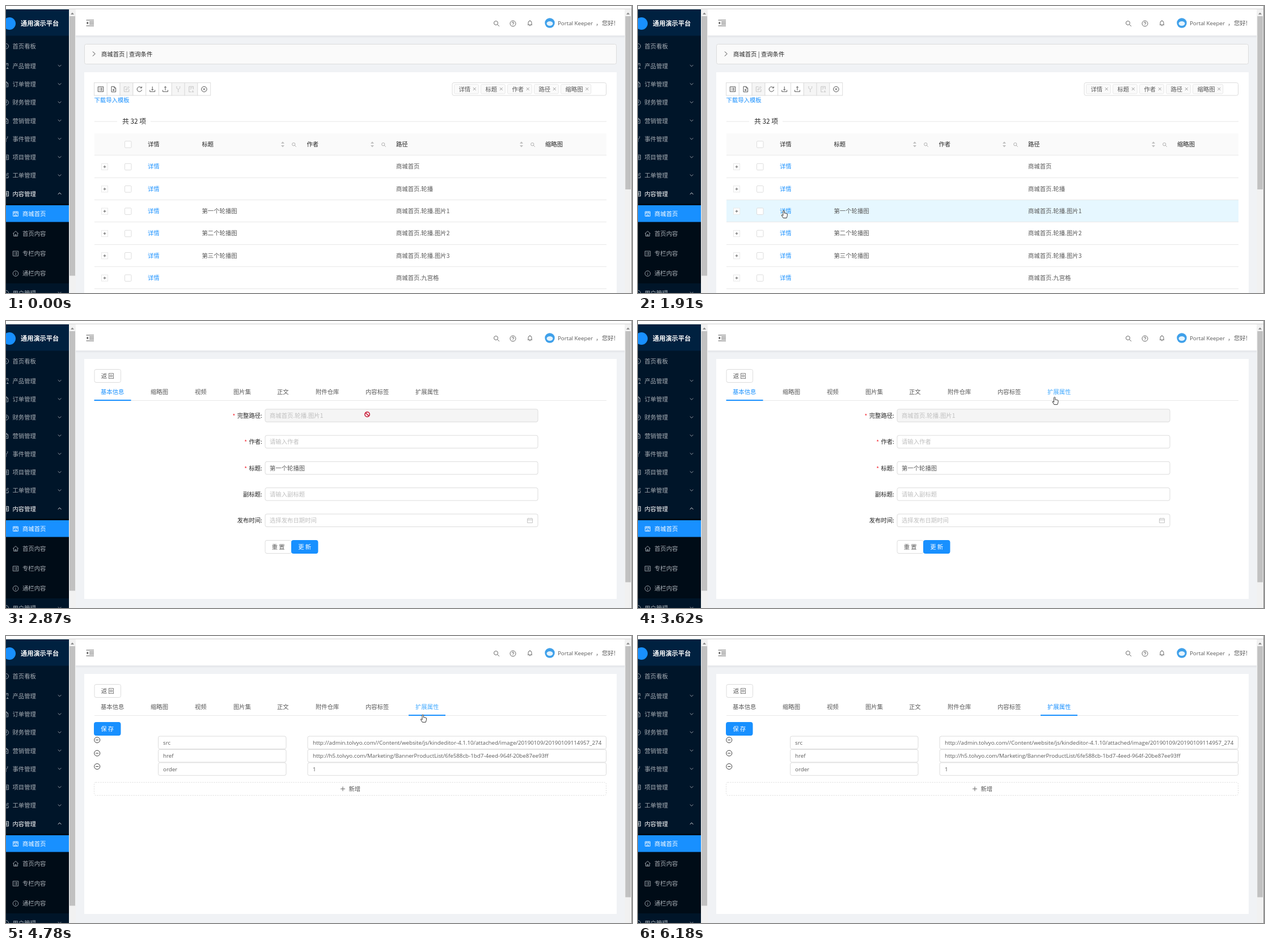
An HTML page that plays this animation: 1104 px wide and 507 px high, repeating every 6.49 s.

```html
<!DOCTYPE html>
<html lang="zh-CN">
<head>
<meta charset="utf-8">
<title>内容管理</title>
<style>
  html, body { margin: 0; width: 100%; height: 100%; overflow: hidden; background: #fff; }
  svg { display: block; }
  text { font: 10.36px "Noto Sans CJK SC", sans-serif; white-space: pre; }
  .latin { font: 9.75px "Open Sans", sans-serif; }
  .brand { font-size: 11.2px; font-weight: 700; }
  .total { font-size: 11.8px; font-weight: 500; }
</style>
</head>
<body>
<svg id="stage" width="1104" height="507" viewBox="0 0 1104 507"></svg>
<script>
const LOOP = 6490, OPEN = 1970, SWITCH = 3850, LEAVE = 6180;
const BLUE = '#1890ff', HOVER = '#40a9ff', INK = '#595959', DARK = '#262626',
      LINE = '#dcdcdc', PALE = '#e8e8e8', FAINT = '#bfbfbf', MENU = '#a6adb4';

// Shapes are centred on 0,0
const ring = 'M5 0A5 5 0 1 1-5 0A5 5 0 1 1 5 0';
const icons = {
  list: 'M-5-4.5H5V4.5H-5ZM-3-2h1M-3 0h1M-3 2h1M-.5-2H3M-.5 0H3M-.5 2H3',
  fileAdd: 'M-4-5H1L4-2V5H-4ZM1-5V-2H4M-2 1.5H2M0-.5V3.5',
  edit: 'M0-4.5H-4.5V4.5H4.5V0M-1.5 1.5L-1-.5L3.5-5L5-3.5L.5 1Z',
  reload: 'M3.6-2.7A4.5 4.5 0 1 0 4.4 1M4.2-5V-2.3H1.4',
  download: 'M-4.7 1.5V4.5H4.7V1.5M0-5V2M-2 0L0 2L2 0',
  upload: 'M-4.7 1.5V4.5H4.7V1.5M0 2V-5M-2-3L0-5L2-3',
  fork: 'M-3-3.5V-2L0 .5L3-2V-3.5M0 .5V4M-4-4.5h2M2-4.5h2M-1 4.5h2',
  audit: 'M0 5H-4V-5H4V0M-2-2.5H2M-2 0H0M1 5H5M3 5V2',
  close: ring + 'M-2-2L2 2M2-2L-2 2',
  help: ring + 'M-1.6-1A1.6 1.6 0 1 1 0 .6V1.3M0 2.3V3.1',
  info: ring + 'M0-.8V2.8M0-2.8V-2',
  minus: ring + 'M-2.5 0H2.5',
  search: 'M2.5-1A3.5 3.5 0 1 1-4.5-1A3.5 3.5 0 1 1 2.5-1M1.6 1.6L5 5',
  bell: 'M-4 3.2H4M-3 3.2V-.6A3 3 0 0 1 3-.6V3.2M0-4.7V-3.6M-1 4.8H1',
  home: 'M-5.2 0L0-4.7L5.2 0M-3.6-1V4.5H3.6V-1M-1 4.5V1.5H1V4.5',
  shop: 'M-4.5-4H4.5V4.5H-4.5ZM-4.5-1.2H4.5M-1.5-4V-1.2M1.5-4V-1.2M-1.5 4.5V2H1.5V4.5',
  calendar: 'M-4.5-3.5H4.5V4H-4.5ZM-4.5-1H4.5M-2-4.8V-2.5M2-4.8V-2.5',
  plus: 'M-4 0H4M0-4V4', cross: 'M-3-3L3 3M3-3L-3 3',
  down: 'M-2.8-1.4L0 1.4L2.8-1.4', up: 'M-2.8 1.4L0-1.4L2.8 1.4', right: 'M-2-4L2 0L-2 4',
};

// text() takes the middle line of the text, not its baseline
const text = (x, y, s, fill = INK, more = '') => `<text x="${x}" y="${y + 3.8}" fill="${fill}" ${more}>${s}</text>`;
const rect = (x, y, w, h, fill, stroke = 'none', more = '') =>
  `<rect x="${x}" y="${y}" width="${w}" height="${h}" fill="${fill}" stroke="${stroke}" ${more}/>`;
const rule = (x, y, w) => rect(x, y, w, 1, PALE);
const icon = (name, x, y, color = INK, scale = 1) =>
  `<path d="${icons[name]}" transform="translate(${x} ${y}) scale(${scale})" fill="none" stroke="${color}" stroke-width="${.9 / scale}"/>`;
const fill = (d, color) => `<path d="${d}" fill="${color}"/>`;
const each = (list, f) => list.map(f).join('');
const button = (x, y, label, primary) =>
  rect(x + .5, y + .5, 46.5, 23, primary ? BLUE : '#fff', primary ? BLUE : LINE, 'rx="3"') +
  text(x + 23.7, y + 12, label, primary ? '#fff' : INK, 'text-anchor="middle"');

const fields = [];
function field(scene, x, y, w, disabled) {
  fields.push({ scene, x, y, w, h: 23, disabled });
  return rect(x + .5, y + .5, w - 1, 22.5, disabled ? '#f5f5f5' : '#fff', LINE, `rx="3" id="field${fields.length - 1}"`);
}

function sidebar() {
  const items = ['首页看板', '产品管理', '订单管理', '财务管理', '营销管理', '事件管理', '项目管理', '工单管理', '内容管理', '用户管理'];
  const middles = [71, 106, 138.3, 170.5, 202.8, 235, 267.3, 299.5, 331.8, 507];
  const glyphs = ['info', 'audit', 'fileAdd', 'help', 'fileAdd', 'fork', 'list', 'edit', 'list', 'info'];
  const sub = [['商城首页', 'shop'], ['首页内容', 'home'], ['专栏内容', 'list'], ['通栏内容', 'info']];
  return rect(0, 6, 111, 501, '#001529') + rect(0, 6, 111, 46.5, '#002140') +
    `<circle cx="6" cy="31" r="11" fill="${BLUE}"/>` +
    text(26, 31, '通用演示平台', '#fff', 'class="brand"') +
    rect(0, 349, 111, 141, '#000c17') + rect(0, 352, 111, 29.5, BLUE) +
    each(items, (s, i) => {
      const open = i === 8, color = open ? '#fff' : MENU;
      return icon(glyphs[i], 0, middles[i], color, .9) + text(11.5, middles[i], s, color) +
        (i ? icon(open ? 'up' : 'down', 94.5, middles[i] - .5, color) : '');
    }) +
    each(sub, ([s, glyph], i) => {
      const y = 367 + i * 35.2, color = i ? MENU : '#fff';
      return icon(glyph, 17, y, color, .95) + text(29, y, s, color);
    }) +
    rect(111, 6, 12, 501, '#f1f1f1') + rect(112, 18, 10, 458.5, '#c1c1c1') + fill('M114 15H120L117 11.5Z', '#8a8a8a');
}

function header() {
  return rect(123, 6, 968, 46.5, '#fff') + rect(123, 52.5, 968, 1, '#d8dadd') + rect(123, 53.5, 968, 2, '#e8eaed') +
    `<path d="M141.5 25H155M147 28.3H155M147 31.6H155M141.5 35H155" stroke="${INK}" stroke-width="1.2"/>` +
    fill('M141.5 30L145 27.6V32.4Z', INK) +
    icon('search', 865, 31) + icon('help', 894, 31) + icon('bell', 924, 30) +
    '<circle cx="959" cy="30" r="8.7" fill="#3fa0ea"/><ellipse cx="959" cy="31" rx="5.5" ry="4" fill="#e4f3fd"/>' +
    text(973, 30, 'Portal Keeper', INK, 'class="latin"') + text(1040, 30, '，') + text(1051, 30, '您好!');
}

function listScene() {
  const tools = ['list', 'fileAdd', 'edit', 'reload', 'download', 'upload', 'fork', 'audit', 'close'];
  const columns = [['详情', 250], ['标题', 345.5, 488], ['作者', 530.5, 646], ['路径', 688, 909], ['缩略图', 951]];
  const rows = [['', '商城首页'], ['', '商城首页.轮播'], ['第一个轮播图', '商城首页.轮播.图片1'],
    ['第二个轮播图', '商城首页.轮播.图片2'], ['第三个轮播图', '商城首页.轮播.图片3'], ['', '商城首页.九宫格']];
  const checkbox = y => rect(209.5, y - 5.7, 11.5, 11.5, '#fff', LINE, 'rx="1.5"');
  return rect(138.5, 67.5, 938, 35, '#fafafa', LINE, 'rx="3"') + icon('right', 155, 84.5, DARK) +
    text(168, 85, '商城首页 | 查询条件', DARK) + rect(138, 117, 939, 390, '#fff') +
    each(tools, (name, i) => {
      const off = [2, 6, 7].includes(i), x = 155.5 + i * 22.8;
      return rect(x, 135.5, 22.8, 22.5, off ? '#f5f5f5' : '#fff', LINE) + icon(name, x + 11.5, 147, off ? FAINT : '#404040', .95);
    }) +
    text(155.5, 166.5, '下载导入模板', BLUE) +
    rect(787, 135.5, 271.5, 22.5, '#fff', LINE, 'rx="3"') +
    each(columns, ([s], i) => {
      const x = 791 + i * 47, w = s.length * 10.4 + 22;
      return rect(x - .5, 138.5, w, 16.5, '#fafafa', PALE, 'rx="2"') + text(x + 7.5, 147, s) +
        icon('cross', x + w - 7.5, 146.5, '#8c8c8c', .8);
    }) +
    rule(156, 203.5, 40) + text(205, 204.3, '共 32 项', DARK, 'class="total"') + rule(255, 203.5, 804) +
    rect(156, 225, 903, 38.5, '#fafafa') + rule(156, 263, 903) + checkbox(244.5) +
    each(columns, ([s, x, sort]) => text(x, 244.5, s, DARK) + (sort ?
      fill(`M${sort - 3} 243H${sort + 3}L${sort} 239.5ZM${sort - 3} 246H${sort + 3}L${sort} 249.5Z`, FAINT) +
      icon('search', sort + 20, 245, '#a6a6a6', .75) : '')) +
    rect(156, 0, 903, 38.3, '#e6f7ff', 'none', 'id="rowHover"') +
    each(rows, ([title, path], i) => {
      const y = 284 + i * 39.3;
      return rule(156, Math.round(y + 18.7), 903) + rect(168.5, y - 5.5, 11, 11, '#fff', PALE) + icon('plus', 174, y, INK, .6) +
        checkbox(y) + text(250, y - .5, '详情', BLUE) + text(345.5, y - .5, title) + text(688, y - .5, path);
    });
}

const tabs = [['基本信息', 167], ['缩略图', 255], ['视频', 333], ['图片集', 401], ['正文', 478], ['附件仓库', 546], ['内容标签', 634], ['扩展属性', 722]];

function formPane() {
  const rows = [['完整路径', '商城首页.轮播.图片1', 1], ['作者', '请输入作者', 1], ['标题', '第一个轮播图', 1], ['副标题', '请输入副标题'], ['发布时间', '选择发布日期时间']];
  return each(rows, ([label, value, required], i) => {
    const y = 167.3 + i * 46.3;
    return text(452, y, label + ':', DARK, 'text-anchor="end"') +
      (required ? text(446 - label.length * 10.4, y + 1, '*', '#f5222d', 'text-anchor="end"') : '') +
      field('form', 456.5, y - 12, 482, i === 0) + text(465, y, value, i === 2 ? INK : FAINT);
  }) + icon('calendar', 924, 352.5, FAINT) + button(456.5, 387, '重 置') + button(503, 387, '更 新', true);
}

function attributePane() {
  const rows = [
    ['src', 'http://admin.tolvyo.com//Content/website/js/kindeditor-4.1.10/attached/image/20190109/20190109114957_274'],
    ['href', 'http://h5.tolvyo.com/Marketing/BannerProductList/6fe588cb-1bd7-4eed-964f-20be87ee93ff'],
    ['order', '1']];
  return button(155, 152, '保 存', true) + each(rows, ([key, value], i) => {
    const y = 188.2 + i * 23.4;
    return icon('minus', 160.7, y - 4.5, DARK) + field('attributes', 268, y - 11.7, 226.5) + field('attributes', 531.5, y - 11.7, 527.5) +
      text(277, y, key, INK, 'class="latin"') +
      `<svg x="541" y="${y - 10}" width="510" height="20">${text(0, 10, value, INK, 'class="latin"')}</svg>`;
  }) + rect(155.5, 258.5, 903, 23, '#fff', LINE, 'rx="3" stroke-dasharray="2 2" id="addBox"') +
    `<g id="addLabel">${icon('plus', 594, 270)}${text(604.5, 270, '新增')}</g>`;
}

function detailScene() {
  return rect(138, 67, 939, 424, '#fff') + button(155.5, 85, '返 回') +
    each(tabs, ([s, x], i) => text(x, 125.5, s, INK, `id="tab${i}"`)) + rule(156, 140, 903) +
    rect(155.5, 139, 65, 2, BLUE, 'none', 'id="inkBar"') +
    `<g id="form">${formPane()}</g>` +
    `<svg x="155" y="142" width="905" height="349" viewBox="155 142 905 349"><g id="attributes">${attributePane()}</g></svg>`;
}

const cursors = {
  arrow: '<path d="M0 0V10L2.3 7.9L4 11.3L5.5 10.6L4 7.3H7Z" fill="#fff" stroke="#222" stroke-width=".8"/>',
  hand: '<path d="M-1.2 1Q0-.6 1.2 1V5Q4 4.6 6.3 6.2V9.5L5 13.5H-.8L-3.8 8.8Q-3.6 7.4-2.5 8L-1.2 9.3Z" fill="#fff" stroke="#222" stroke-width=".9"/>',
  beam: '<path d="M-2-5.5H2M0-5.5V5.5M-2 5.5H2" fill="none" stroke="#222"/>',
  denied: '<path d="M4.2 0A4.2 4.2 0 1 1-4.2 0A4.2 4.2 0 1 1 4.2 0M-3-3L3 3" fill="none" stroke="#c8102e" stroke-width="1.5"/>',
};

stage.innerHTML = rect(0, 4.5, 1104, 1.5, '#dcdcdc') + rect(123, 6, 968, 501, '#f0f2f5') +
  `<g id="list">${listScene()}</g><g id="detail">${detailScene()}</g>` + header() + sidebar() +
  rect(1091, 6, 12, 501, '#f1f1f1') + rect(1103, 0, 1, 507, '#8a8a8a') +
  rect(1092.3, 18, 9.7, 306, '#c1c1c1', 'none', 'id="thumb"') + fill('M1094 15H1100L1097 11.5Z', '#8a8a8a') +
  `<g id="pointer">${each(Object.entries(cursors), ([k, s]) => `<g id="${k}">${s}</g>`)}</g>`;

const $ = id => document.getElementById(id);
const set = (id, name, value) => $(id).setAttribute(name, value);
const show = (id, on) => set(id, 'display', on ? 'inline' : 'none');
const inside = (p, x, y, w, h) => p && p.x >= x && p.x < x + w && p.y >= y && p.y < y + h;
const ease = u => u < .5 ? 4 * u ** 3 : 1 - (2 - 2 * u) ** 3 / 2;
const clamp = u => Math.min(1, Math.max(0, u));

// start, end, number of poses, then a quadratic curve
const moves = [
  [370, 960, 9, 1000, 497, 535, 335, 314, 349],
  [1040, 1450, 6, 310, 350, 275, 355, 257, 361],
  [2370, 2980, 9, 257, 361, 651, 137, 670, 162],
  [3090, 3690, 9, 672, 161, 710, 150, 743, 129],
  [4550, 5190, 9, 743, 129, 720, 145, 755, 190],
  [5250, 5890, 9, 758, 192, 840, 300, 990, 455],
  [5960, 6180, 4, 1010, 470, 1039, 492, 1069, 515],
];

function pointerAt(t) {
  const move = moves.filter(m => t >= m[0]).pop();
  if (!move || t >= LEAVE) return null;
  const [start, end, poses, x0, y0, x1, y1, x2, y2] = move;
  const p = Math.floor(clamp((t - start) / (end - start)) * (poses - 1)) / (poses - 1);
  const curve = (a, b, c) => (1 - p) ** 2 * a + 2 * p * (1 - p) * b + p * p * c;
  return { x: curve(x0, x1, x2), y: curve(y0, y1, y2) };
}

function draw(t) {
  const p = pointerAt(t), opened = t >= OPEN;
  const step = 550 / 7, since = Math.floor((t - SWITCH) / step) * step + 12;
  const slide = t < SWITCH ? 0 : ease(clamp(since / 300));
  const switched = t >= SWITCH + step;
  const scene = !opened ? 'list' : switched ? 'attributes' : 'form';

  show('list', !opened);
  show('detail', opened);
  set('thumb', 'height', opened ? 443.5 : 306);

  const row = p ? Math.floor((p.y - 264) / 39.3) : -1;
  show('rowHover', !opened && inside(p, 156, 264, 903, 236));
  set('rowHover', 'y', 264 + row * 39.3);

  show('form', !switched);
  show('attributes', switched);
  set('attributes', 'transform', `translate(${(1 - slide) * 7 * 903} 0)`);
  set('attributes', 'opacity', ease(clamp(since / 450)));
  set('inkBar', 'x', 155.5 + slide * 554.5);

  const onTab = opened && inside(p, 710, 112, 65, 29);
  set('tab0', 'fill', t < SWITCH ? BLUE : INK);
  set('tab7', 'fill', onTab ? HOVER : t < SWITCH ? INK : BLUE);

  const onAdd = scene === 'attributes' && inside(p, 155, 258, 904, 24);
  set('addBox', 'stroke', onAdd ? HOVER : LINE);
  for (const el of $('addLabel').children) el.setAttribute(el.tagName === 'path' ? 'stroke' : 'fill', onAdd ? HOVER : INK);

  let kind = onTab || onAdd || (!opened && inside(p, 250, 355, 22, 14)) ? 'hand' : 'arrow';
  fields.forEach((f, i) => {
    const over = f.scene === scene && inside(p, f.x, f.y, f.w, f.h);
    if (over) kind = f.disabled ? 'denied' : 'beam';
    set('field' + i, 'stroke', over && !f.disabled ? HOVER : LINE);
  });

  show('pointer', p);
  if (p) set('pointer', 'transform', `translate(${p.x} ${p.y})`);
  for (const k in cursors) show(k, k === kind);
}

function tick() {
  draw(performance.now() % LOOP);
  requestAnimationFrame(tick);
}
tick();
</script>
</body>
</html>
```
